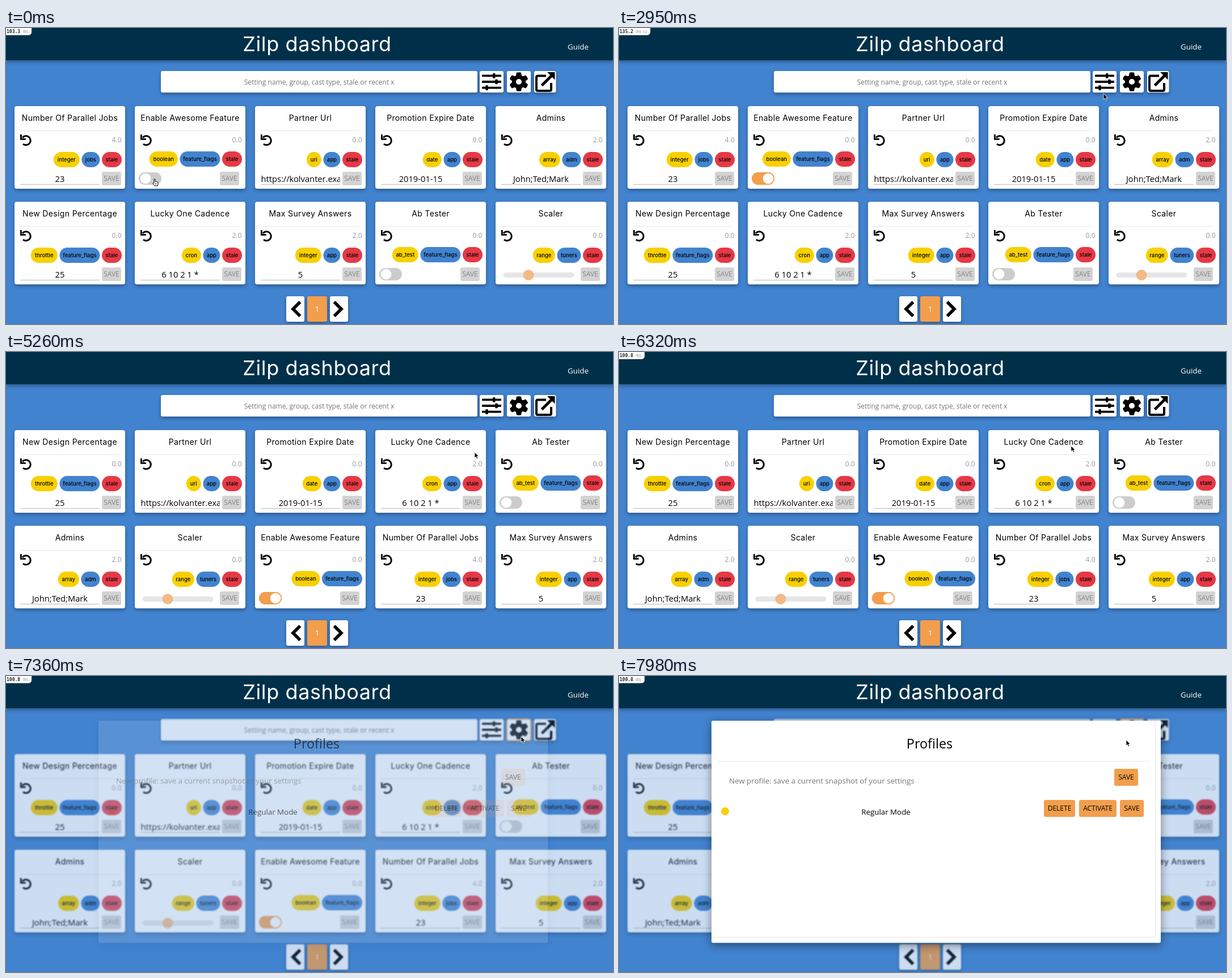
Write an HTML page that moves like this. It is 1070 px wide and 523 px high and loops after 8000 ms.

```html
<!DOCTYPE html>
<html lang="en">
<head>
<meta charset="utf-8">
<title>Dashboard</title>
<style>
  html, body { margin: 0; width: 100%; height: 100%; overflow: hidden; background: #4283cf; }
  svg { display: block; width: 1070px; height: 523px; font-family: "Open Sans", sans-serif; }
  .head { font-family: Inter, sans-serif; }
  .mono { font-family: "DejaVu Sans Mono", monospace; }
  .lift { filter: drop-shadow(0 3px 3px rgba(0, 0, 0, .32)); }
  .float { filter: drop-shadow(0 4px 8px rgba(0, 0, 0, .45)); }
  .dim { opacity: .73; filter: blur(.9px); }
</style>
</head>
<body>
<svg viewBox="0 0 1070 523">
  <rect width="1070" height="523" fill="#4283cf"/>
  <g id="page">
    <g id="tools"></g>
    <g id="cards"></g>
    <g id="pager"></g>
  </g>
  <g id="header"></g>
  <g id="menu"></g>
  <g id="modal"></g>
  <g id="badge"></g>
  <g id="cursor"></g>
</svg>
<script>
const LOOP = 8000, ORANGE = '#f29e4c', YELLOW = '#f8d000', BLUE = '#4283cf', RED = '#e63946';
const $ = id => document.getElementById(id);

const rect = (x, y, w, h, fill, r = 0, more = '') =>
  `<rect x="${x}" y="${y}" width="${w}" height="${h}" rx="${r}" fill="${fill}" ${more}/>`;
const text = (x, y, s, size, fill = '#000', anchor = 'middle', more = '') =>
  `<text x="${x}" y="${y}" font-size="${size}" fill="${fill}" text-anchor="${anchor}" ${more}>${s}</text>`;
const line = (d, width, color = '#000', more = '') =>
  `<path d="${d}" fill="none" stroke="${color}" stroke-width="${width}" ${more}/>`;
const circle = (x, y, r, fill, more = '') => `<circle cx="${x}" cy="${y}" r="${r}" fill="${fill}" ${more}/>`;

const drawn = {};
function put(id, html) {
  if (drawn[id] !== html) $(id).innerHTML = drawn[id] = html;
}

// Share of a stepped change that is done: n equal jumps, the first at t0, the last at t1.
function steps(t, t0, t1, n) {
  if (t < t0) return 0;
  const k = Math.floor((t - t0) / (t1 - t0) * (n - 1) + 1e-6) + 1;
  return Math.min(k, n) / n;
}

// ---- cards ----
const PILL = { integer: 46, jobs: 32, stale: 35, boolean: 50, feature_flags: 71, uri: 26, app: 30, date: 33,
  array: 37, adm: 33, throttle: 47, cron: 34, ab_test: 46, range: 39, tuners: 42 };
const CARDS = [
  ['Number Of Parallel Jobs', '4.0', 'integer', 'jobs', '23'],
  ['Enable Awesome Feature', '0.0', 'boolean', 'feature_flags'],
  ['Partner Url', '0.0', 'uri', 'app', 'https://kolvanter.example'],
  ['Promotion Expire Date', '0.0', 'date', 'app', '2019-01-15'],
  ['Admins', '2.0', 'array', 'adm', 'John;Ted;Mark'],
  ['New Design Percentage', '0.0', 'throttle', 'feature_flags', '25'],
  ['Lucky One Cadence', '2.0', 'cron', 'app', '6 10 2 1 *'],
  ['Max Survey Answers', '2.0', 'integer', 'app', '5'],
  ['Ab Tester', '0.0', 'ab_test', 'feature_flags'],
  ['Scaler', '0.0', 'range', 'tuners']
];
const SORTED = [5, 2, 3, 6, 8, 4, 9, 1, 0, 7];

function pills(type, group, stale, y) {
  const list = [[type, YELLOW], [group, BLUE]];
  if (stale) list.push(['stale', RED]);
  let x = 189, out = '';
  for (const [name, color] of list.reverse()) {
    const w = PILL[name];
    x -= w;
    out += rect(x, y, w, 27, color, 13.5) +
      text(x + w / 2, y + 16.5, name, 9.5, '#000', 'middle', 'class="head" font-weight="500"');
    x -= 3.6;
  }
  return out;
}

function toggle(on) {
  return rect(7, 117, 40, 22, '#ccc', 11) + rect(7, 117, 40, 22, ORANGE, 11, `opacity="${on}"`) +
    circle(19 + 17 * on, 128, 9.3, '#fff');
}

function field(value, type) {
  const base = line('M10 138.5H150', 1.5, '#ccc');
  return base + (type === 'uri'
    ? `<g clip-path="inset(0)"><svg x="10" y="110" width="140" height="28">${text(.5, 23.5, value, 14.7, '#000', 'start')}</svg></g>`
    : text(80, 133.5, value, 14.7));
}

function card(index, slot, s) {
  const [title, order, type, group, value] = CARDS[index];
  const isToggle = type === 'boolean' || type === 'ab_test';
  const live = type === 'boolean' ? s.live : 0;
  const control = isToggle ? toggle(type === 'boolean' ? s.on : 0)
    : type === 'range' ? rect(13.5, 125, 125, 9, '#e6e6e6', 4.5) +
      circle(58, 129.5, 8.8, '#f4ba85', 'stroke="#e9a96f" stroke-width=".8"')
    : field(value, type);
  const bx = value ? 154 : 150;
  return `<g transform="translate(${15 + slot % 5 * 212} ${slot < 5 ? 138 : 307})">` +
    rect(0, 0, 195, 146, '#fff', 4, 'class="lift"') +
    text(97.5, 26, title, 14, '#000', 'middle', 'class="head" letter-spacing=".35"') +
    line('M10 43.5H185', 1, '#e6e6e6') +
    line('M14 55.8A8 8 0 1 1 15 66.8', 3) + line('M11.4 50v8.3h8.4', 2.8) +
    text(188.5, 64, order, 12, '#999', 'end') +
    pills(type, group, type !== 'boolean' || !s.sorted, isToggle ? 80 : 81) +
    control +
    rect(bx, 116, 34, 24, live ? s.hover ? '#e59140' : ORANGE : '#d3d3d3', 3) +
    text(bx + 17, 132.3, 'SAVE', 12, live ? '#000' : '#858585') + '</g>';
}

// ---- fixed parts ----
function slidersIcon() {
  const bars = [[84.4, 860.2], [95, 864.5], [105.6, 847.5]];
  return bars.map(([y, x]) => rect(839, y - 1.9, 34, 3.8, '#000', 1) + rect(x - 2.2, y - 4.3, 4.4, 8.6, '#000', 1)).join('');
}

function gearIcon() {
  let out = circle(904, 95, 8.6, 'none', 'stroke="#000" stroke-width="7"');
  for (let a = 0; a < 360; a += 60)
    out += `<path d="M899 84l1-5.2q4-1.2 8 0l1 5.2z" transform="rotate(${a} 904 95)"/>`;
  return out;
}

function linkIcon() {
  return line('M952 84.5H937.5Q935 84.5 935 87V108.5Q935 111 937.5 111H958.5Q961 111 961 108.5V97', 4) +
    line('M944.5 101.5L963 83', 5) + '<path d="M954 78h13.5v13.5z"/>';
}

function tools(focus) {
  const box = (x, w, name) => rect(x, 76, w, 38, '#fff', 3, 'class="lift"') +
    (focus === name ? rect(x, 75.8, w, 38.4, 'none', 3, `stroke="${ORANGE}" stroke-width="1.8"`) : '');
  return rect(273, 76, 558, 38, '#fff', 3, 'class="lift"') +
    text(552, 99.5, 'Setting name, group, cast type, stale or recent x', 12, '#757575') +
    box(835, 42, 'sliders') + slidersIcon() + box(883, 42, 'gear') + gearIcon() + box(931, 38.5) + linkIcon();
}

put('pager', [[494, 32, '#fff'], [531, 35, ORANGE], [571, 32, '#fff']]
  .map(([x, w, fill]) => rect(x, 474, w, 45, fill, 3, 'class="lift"')).join('') +
  line('M516.5 486L506 496.5L516.5 507', 5.6, '#000', 'stroke-linecap="square"') +
  line('M580.5 486L591 496.5L580.5 507', 5.6, '#000', 'stroke-linecap="square"') +
  text(548.5, 501, '1', 13.33, '#fff'));

put('header', rect(0, 0, 1070, 57, '#003049', 0, 'class="lift"') +
  text(548.5, 41, 'Zilp dashboard', 36, '#fff', 'middle', 'class="head" letter-spacing=".6"') +
  text(1027, 38, 'Guide', 13.33, '#fff', 'end'));

// ---- overlays ----
function menu(cursorY) {
  const row = Math.floor((cursorY - 115) / 25);
  return rect(768, 109, 90, 112, '#fff', 3, 'class="float"') +
    ['name', 'updated_at', 'cast_type', 'group'].map((s, i) =>
      (i === row ? rect(774, 115.5 + 25 * i, 77, 24.5, ORANGE, 3) : '') +
      text(812.5, 133 + 25 * i, s, 13.33)).join('');
}

function modal(a) {
  const ink = `opacity="${Math.min(1, .55 + a * .5)}"`;
  const button = (x, y, w, s) => rect(x, y, w, 30, ORANGE, 3, `opacity="${a}"`) +
    text(x + w / 2, y + 19.3, s, 12, '#000', 'middle', `opacity="${Math.min(1, .3 + a)}"`);
  return `<g opacity="${a}">` + rect(163, 79, 792, 392.5, '#fff', 3, 'class="float"') +
    line('M173 150.5H935M163 461.5H945.5V79', 1, '#e8e8e8') + circle(187, 239, 7, YELLOW) + '</g>' +
    text(547.5, 128, 'Profiles', 23.4, '#000', 'middle', ink) +
    text(194, 190, 'New profile: save a current snapshot of your settings', 13.33, '#757575', 'start', ink) +
    text(470.5, 245, 'Regular Mode', 13.33, '#000', 'middle', ink) +
    button(873, 164, 42, 'SAVE') + button(749, 219, 55, 'DELETE') +
    button(811, 219, 66, 'ACTIVATE') + button(883, 219, 42, 'SAVE');
}

function badge(ms, twice) {
  return rect(-6, -6, twice ? 61 : 51, 18.5, '#fff', 5, 'stroke="#bbb" stroke-width=".6"') +
    `<g class="mono">` + text(1, 9, ms, 8, '#222', 'start', 'font-weight="bold"') +
    text(30, 9, 'ms', 8, '#999', 'start') + (twice ? text(42, 8.5, '×2', 6.5, '#888', 'start') : '') + '</g>';
}

// ---- pointer: start, end, jumps, then the point reached ----
const MOVES = [
  [350, 870, 7, 391, 272],
  [2160, 2510, 5, 938, 150], [2600, 2950, 5, 854, 116],
  [3040, 3300, 4, 852, 103], [3480, 3830, 5, 833, 130], [3920, 4270, 5, 826, 177],
  [5880, 6060, 3, 842, 172], [6150, 6670, 7, 684, 150], [6760, 7100, 5, 908, 107],
  [7450, 7720, 4, 901, 114], [7890, 7980, 2, 894, 113]
];

function pointerAt(t) {
  let x = 262, y = 267;
  for (const [t0, t1, n, toX, toY] of MOVES) {
    const p = steps(t, t0, t1, n);
    x += (toX - x) * p;
    y += (toY - y) * p;
  }
  return [x, y];
}

const ARROW = '<path d="M0 0V10.2L2.4 8L4 11.8L5.8 11L4.2 7.3H7.3Z" stroke="#fff" stroke-width=".8"/>';
const HAND = '<path d="M-1 .3Q0-.8 1 .3V4L5 5Q6.4 5.4 6.2 7L5.4 11.8H-.4L-3 7.6Q-3.4 6 -1 7Z" fill="#fff" stroke="#000" stroke-width="1"/>' +
  line('M1.2 7v2.6M3 7v2.6', .7);

function draw(t) {
  const [x, y] = pointerAt(t);
  const sorted = t >= 5170;
  const menuOpen = t >= 3390 && t < 5170;
  const state = {
    sorted,
    on: steps(t, 90, 350, 4),
    live: t >= 180 && t < 1640,
    hover: t >= 950
  };
  put('cards', CARDS.map((_, slot) => card(sorted ? SORTED[slot] : slot, slot, state)).join(''));
  put('tools', tools(t >= 7190 ? 'gear' : menuOpen ? 'sliders' : ''));
  put('menu', menuOpen ? menu(y) : '');
  $('page').setAttribute('class', t >= 7360 ? 'dim' : '');
  put('modal', t >= 7360 ? modal(.12 + 1.1 * (steps(t, 7360, 7720, 5) - .2)) : '');
  put('badge', t < 1640 ? badge('103.3') : t < 5170 ? badge('135.2', true) : t < 5430 ? '' : badge('100.8'));
  const hand = t < 400 || (t >= 870 && t < 2160);
  put('cursor', `<g transform="translate(${x} ${y})">${hand ? HAND : ARROW}</g>`);
}

const start = performance.now();
function tick() {
  draw((performance.now() - start) % LOOP);
  requestAnimationFrame(tick);
}
tick();
</script>
</body>
</html>
```
